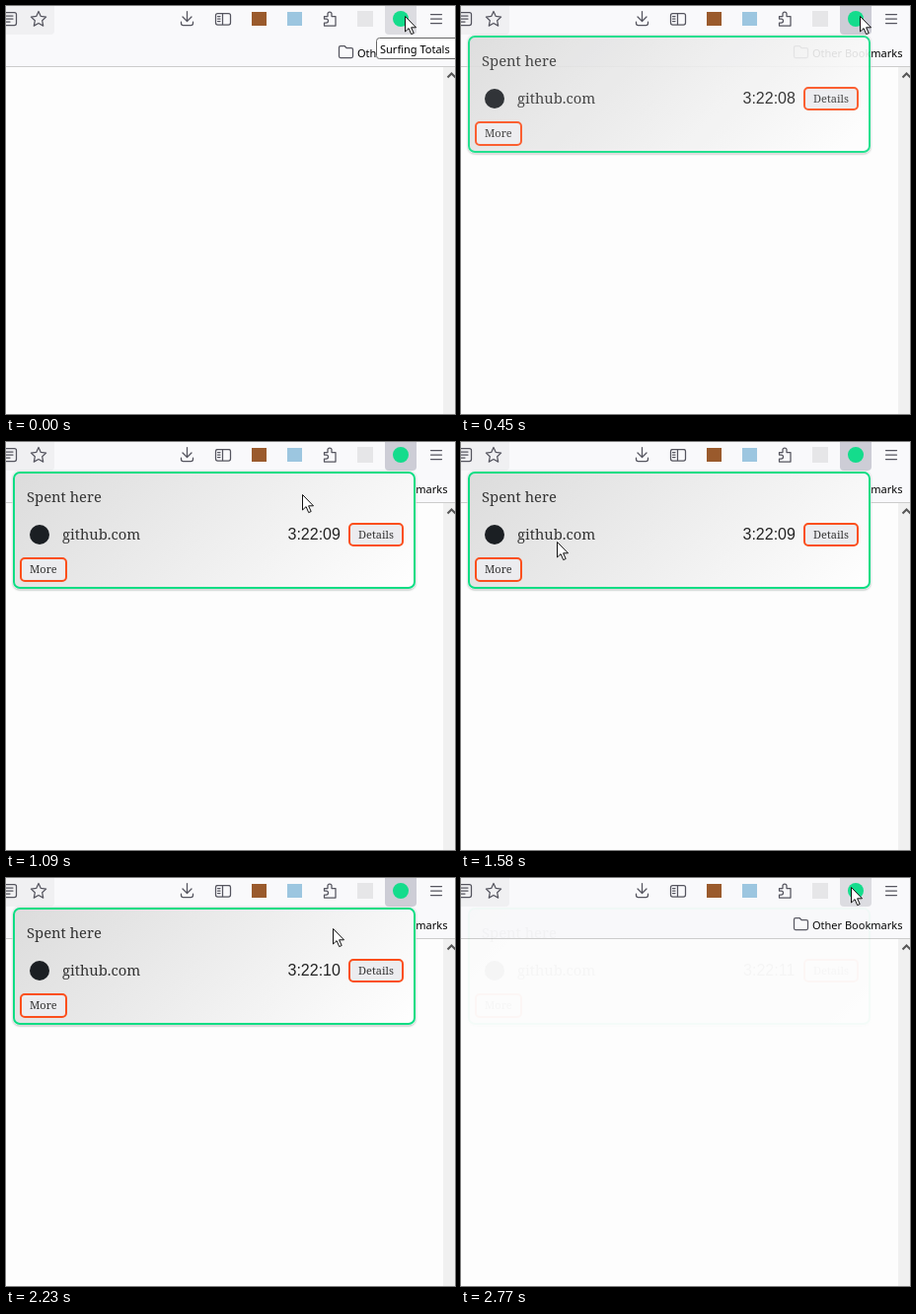
An HTML page that plays this animation: 455x414 px, repeating every 2.82 s.

```html
<!DOCTYPE html>
<html lang="en">
<head>
<meta charset="utf-8">
<title>Toolbar popup</title>
<style>
  html, body { margin: 0; width: 100%; height: 100%; overflow: hidden; background: #fdfdfd; }
  svg { display: block; width: 455px; height: 414px; }
  .ui { font: 11px "Noto Sans", sans-serif; }
  .serif { font: 14.8px "Noto Serif", serif; fill: #333; }
  .small { font-size: 11px; }
  .clock { font: 16px "Liberation Sans", Arial, sans-serif; fill: #222; text-anchor: middle; }
  .icon { fill: none; stroke: #55555f; stroke-width: 1.25; stroke-linejoin: round; stroke-linecap: round; }
  .button { fill: #ececef; stroke: #fb4f1c; stroke-width: 2; }
</style>
</head>
<body>
<svg viewBox="0 0 455 414">
  <defs>
    <linearGradient id="sheen" gradientUnits="userSpaceOnUse" x1="80" y1="-40" x2="343" y2="220">
      <stop stop-color="#dcdcdc"/>
      <stop offset="1" stop-color="#fff"/>
    </linearGradient>
    <filter id="blur" x="-5%" y="-10%" width="110%" height="120%">
      <feGaussianBlur stdDeviation="1"/>
    </filter>
  </defs>

  <!-- Browser window -->
  <rect width="455" height="414" fill="#fdfdfd"/>
  <rect width="455" height="61" fill="#f9f9fb"/>
  <path d="M0 0H49V25a4 4 0 0 1-4 4H0z" fill="#f0f0f2"/>
  <path d="M0 61.5H455" stroke="#ccc"/>
  <rect x="443" y="62" width="12" height="352" fill="#f0f0f0"/>
  <path d="M447.5 72.5l4-4 4 4" fill="none" stroke="#555" stroke-width="2"/>

  <g class="icon">
    <path d="M0 6.5H8.5a2 2 0 0 1 2 2V17.5a2 2 0 0 1-2 2H0M0 10H7M0 13H7M0 16H4"/>
    <path d="M33 5.5l2.3 4.9 5.3.7-3.9 3.7 1 5.3-4.7-2.6-4.7 2.6 1-5.3-3.9-3.7 5.3-.7z"/>
    <path d="M183.5 5.5V15M179 11l4.5 4.5 4.5-4.5M177.5 16v1.5a2 2 0 0 0 2 2h8a2 2 0 0 0 2-2V16"/>
    <path d="M214.5 7.5h11a2 2 0 0 1 2 2v7.5a2 2 0 0 1-2 2h-11a2 2 0 0 1-2-2V9.500a2 2 0 0 1 2-2zM219.500 7.500V19M214.500 10.500h2.500M214.500 13h2.500M214.500 15.500h2.500"/>
    <path d="M322.500 10.500h3.500V8a2 2 0 0 1 4 0v2.500h4V20h-11.500v-3h2a2 2 0 0 0 0-4h-2z"/>
    <path d="M430.500 8.500h11M430.500 13h11M430.500 17.500h11"/>
    <path d="M337.500 51V42a1.500 1.500 0 0 1 1.500-1.500h4l2 2h5a1.500 1.500 0 0 1 1.500 1.500v7a1.500 1.500 0 0 1-1.500 1.500h-11a1.500 1.500 0 0 1-1.500-1.500z"/>
  </g>
  <rect x="249" y="6" width="15" height="14" fill="#9a5a2c"/>
  <rect x="285" y="6" width="15" height="14" fill="#9cc6e0"/>
  <rect x="356" y="5" width="16" height="16" fill="#e6e6e8"/>
  <text class="ui" x="356" y="52">Other Bookmarks</text>

  <path id="action" d="M384 0h32v25a4 4 0 0 1-4 4h-24a4 4 0 0 1-4-4z"/>
  <circle cx="400" cy="13" r="8" fill="#14dc8c"/>

  <g id="tooltip">
    <rect x="375.500" y="32.500" width="90" height="21" rx="3" fill="#fff" stroke="#666"/>
    <text class="ui" x="379" y="48">Surfing Totals</text>
  </g>

  <g id="popup">
    <rect x="7" y="30" width="408" height="120" rx="7" fill="#999" filter="url(#blur)"/>
    <rect x="6.500" y="29.500" width="409" height="120" rx="7" fill="#fafafa"/>
    <rect x="8" y="31" width="406" height="117" rx="6" fill="url(#sheen)" stroke="#0cdd84" stroke-width="2"/>
    <text class="serif" x="21" y="61">Spent here</text>
    <circle cx="34" cy="94" r="10" fill="#1b1f23"/>
    <text class="serif" x="57" y="99">github.com</text>
    <text class="clock" id="clock" x="312.200" y="99"></text>
    <rect class="button" x="348" y="83" width="54" height="22" rx="4"/>
    <text class="serif small" x="357" y="98">Details</text>
    <rect class="button" x="15" y="118" width="46" height="23" rx="4"/>
    <text class="serif small" x="24" y="133">More</text>
  </g>

  <g id="cursor">
    <circle id="click" cx="-1" cy="2" r="12" fill="#f0e628" fill-opacity=".75"/>
    <path d="M.5.5V16l3.600-3.400 2.600 6 2.500-1.100-2.600-5.700h4.900z" fill="#fff" stroke="#111"/>
  </g>
</svg>
<script>
const LOOP = 2820;
const [action, tooltip, popup, clock, cursor, click] =
  ["action", "tooltip", "popup", "clock", "cursor", "click"].map(id => document.getElementById(id));

// Pointer path: time, x, y
const path = [
  [0, 404, 10], [680, 404, 10], [1090, 300, 53], [1240, 179, 68], [1580, 97, 101],
  [1790, 78, 114], [1910, 78, 114], [2230, 331, 51], [2400, 389, 22], [2520, 395, 9], [LOOP, 395, 9]
];

const clamp = v => Math.max(0, Math.min(1, v));
const ramp = (t, from, to) => clamp((t - from) / (to - from));
const within = (t, from, to) => t >= from && t < to;
const show = (el, on) => el.setAttribute("visibility", on ? "visible" : "hidden");

function slope(i, axis) {
  if (i < 0 || i >= path.length - 1) return 0;
  return (path[i + 1][axis] - path[i][axis]) / (path[i + 1][0] - path[i][0]);
}

// Harmonic mean keeps the curve from overshooting.
function tangent(i, axis) {
  const a = slope(i - 1, axis), b = slope(i, axis);
  return a * b > 0 ? 2 * a * b / (a + b) : 0;
}

function position(t, axis) {
  const i = path.findIndex((p, k) => k < path.length - 1 && t < path[k + 1][0]);
  const span = path[i + 1][0] - path[i][0];
  const u = (t - path[i][0]) / span, v = 1 - u;
  return path[i][axis] * v * v * (1 + 2 * u) + path[i + 1][axis] * u * u * (1 + 2 * v)
    + span * u * v * (tangent(i, axis) * v - tangent(i + 1, axis) * u);
}

function draw(now) {
  const t = now % LOOP;
  const seconds = 8 + [740, 1690, 2590].filter(tick => t >= tick).length;
  clock.textContent = "3:22:" + String(seconds).padStart(2, "0");
  popup.setAttribute("opacity", ramp(t, 280, 470) * (1 - ramp(t, 2640, 2775)));
  action.setAttribute("fill", within(t, 230, 2690) ? "#cdcdd6" : "#dcdce1");
  show(tooltip, t < 230);
  show(click, within(t, 180, 320) || within(t, 2540, 2680));
  cursor.setAttribute("transform", `translate(${Math.round(position(t, 1))} ${Math.round(position(t, 2))})`);
  requestAnimationFrame(draw);
}
draw(performance.now());
</script>
</body>
</html>
```
